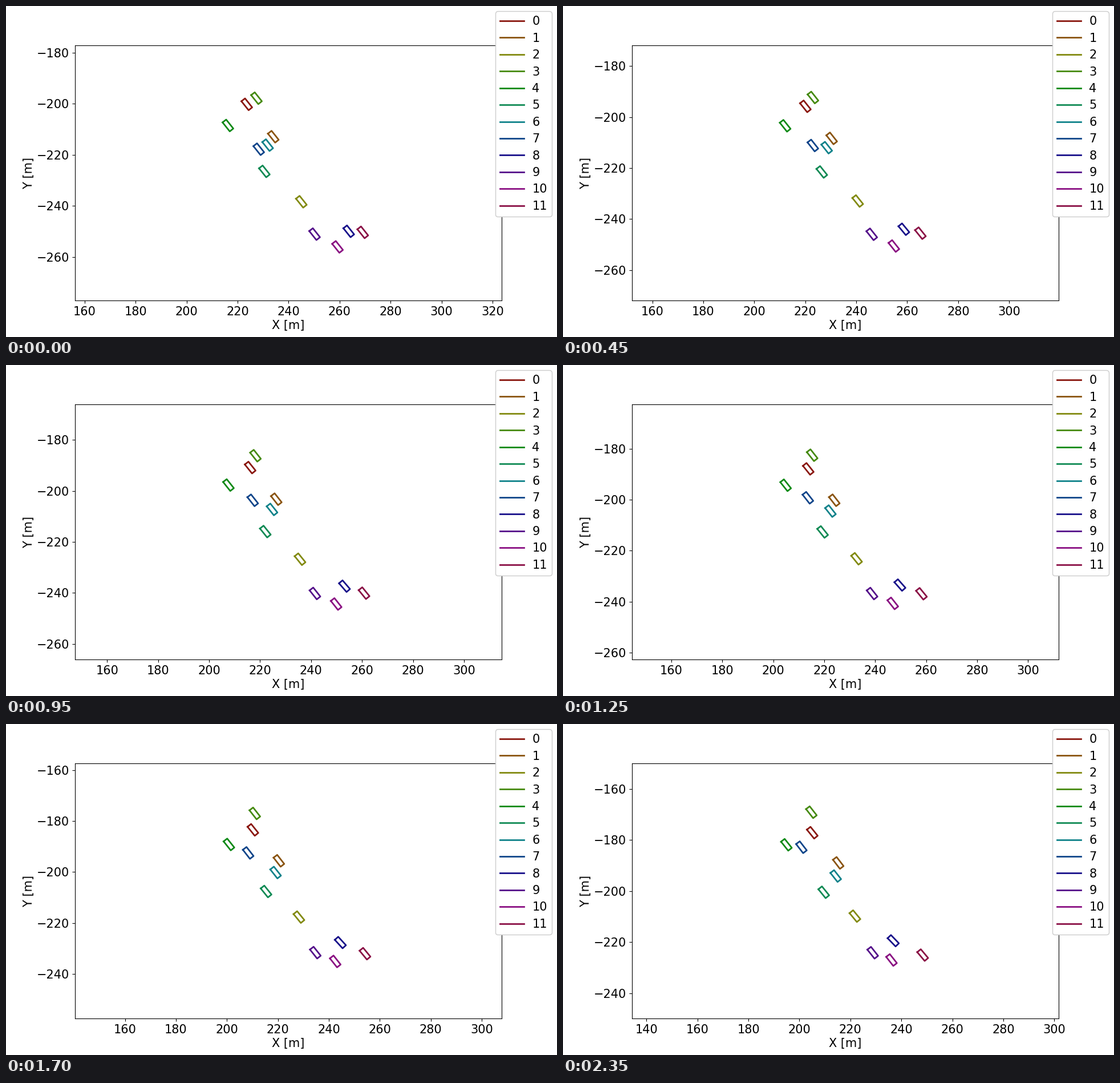
These frames come from a looping animation (966 by 580 pixels, 2400 ms). A matplotlib script:

```python
import colorsys

import matplotlib.pyplot as plt
import numpy as np
from matplotlib.animation import FuncAnimation
from matplotlib.ticker import MultipleLocator

FRAMES = 48
SPAN = 100                  # visible height in metres
LENGTH, WIDTH = 4.5, 1.8    # car size in metres
HEADING = 128.6             # shared first heading in degrees

# Start x, start y, distance driven (metres), turn to the left (degrees)
CARS = np.array([
    (223.6, -200.2, 29.6, 0.3),
    (234.0, -212.9, 30.4, -1.1),
    (245.0, -238.4, 36.8, 0.9),
    (227.4, -197.8, 36.6, -0.6),
    (216.2, -208.5, 34.1, 0),
    (230.5, -226.5, 33.4, 0.4),
    (231.8, -216.2, 28.2, -0.4),
    (228.3, -217.8, 44.5, -0.9),
    (263.6, -250.0, 40.6, 5.3),
    (250.2, -251.1, 34.4, -0.2),
    (259.2, -256.1, 37.1, -0.4),
    (269.1, -250.4, 32.7, 1.4),
])
start, distance, turn = CARS[:, :2], CARS[:, 2], CARS[:, 3]

plt.rcParams.update({"font.family": "DejaVu Sans", "font.size": 15})
fig, ax = plt.subplots(figsize=(9.66, 5.8), dpi=100)
fig.subplots_adjust(top=0.8805)
box = ax.get_window_extent()
HALF_VIEW = np.array([box.width / box.height, 1]) * SPAN / 2


def direction(degrees):
    a = np.radians(degrees)
    return np.stack([np.cos(a), np.sin(a)], axis=-1)


def outline(center, heading):
    """Closed rectangle around center, its long side along heading."""
    along = direction(heading) * LENGTH / 2
    across = direction(heading + 90) * WIDTH / 2
    signs = [(1, 1), (1, -1), (-1, -1), (-1, 1), (1, 1)]
    return np.array([center + a * along + b * across for a, b in signs])


lines = []
for i in range(len(CARS)):
    color = colorsys.hls_to_rgb(i / len(CARS) + 0.01, 0.3, 0.8)
    lines += ax.plot([], [], color=color, lw=2, label=str(i))

ax.set_xlabel("X [m]", labelpad=2.8)
ax.set_ylabel("Y [m]", labelpad=2.8)
for axis in (ax.xaxis, ax.yaxis):
    axis.set_major_locator(MultipleLocator(20))
fig.legend(loc="upper right", framealpha=1, borderpad=0.38,
           borderaxespad=0.45, labelspacing=0.452, handletextpad=0.7)


def update(step):
    t = step / (FRAMES - 1)
    # Steady speed on a shallow arc: the chord has half of the turn so far
    chord = direction(HEADING + turn * t / 2)
    centers = start + chord * (distance * t)[:, None]
    headings = HEADING + turn * t

    # The view follows the middle of the group
    low, high = centers.mean(axis=0) + np.outer([-1, 1], HALF_VIEW)
    ax.set_xlim(low[0], high[0])
    ax.set_ylim(low[1], high[1])
    for line, center, heading in zip(lines, centers, headings):
        line.set_data(*outline(center, heading).T)
    return lines


anim = FuncAnimation(fig, update, frames=FRAMES, interval=50,
                     repeat=True, repeat_delay=0, blit=False)
plt.show()
```
